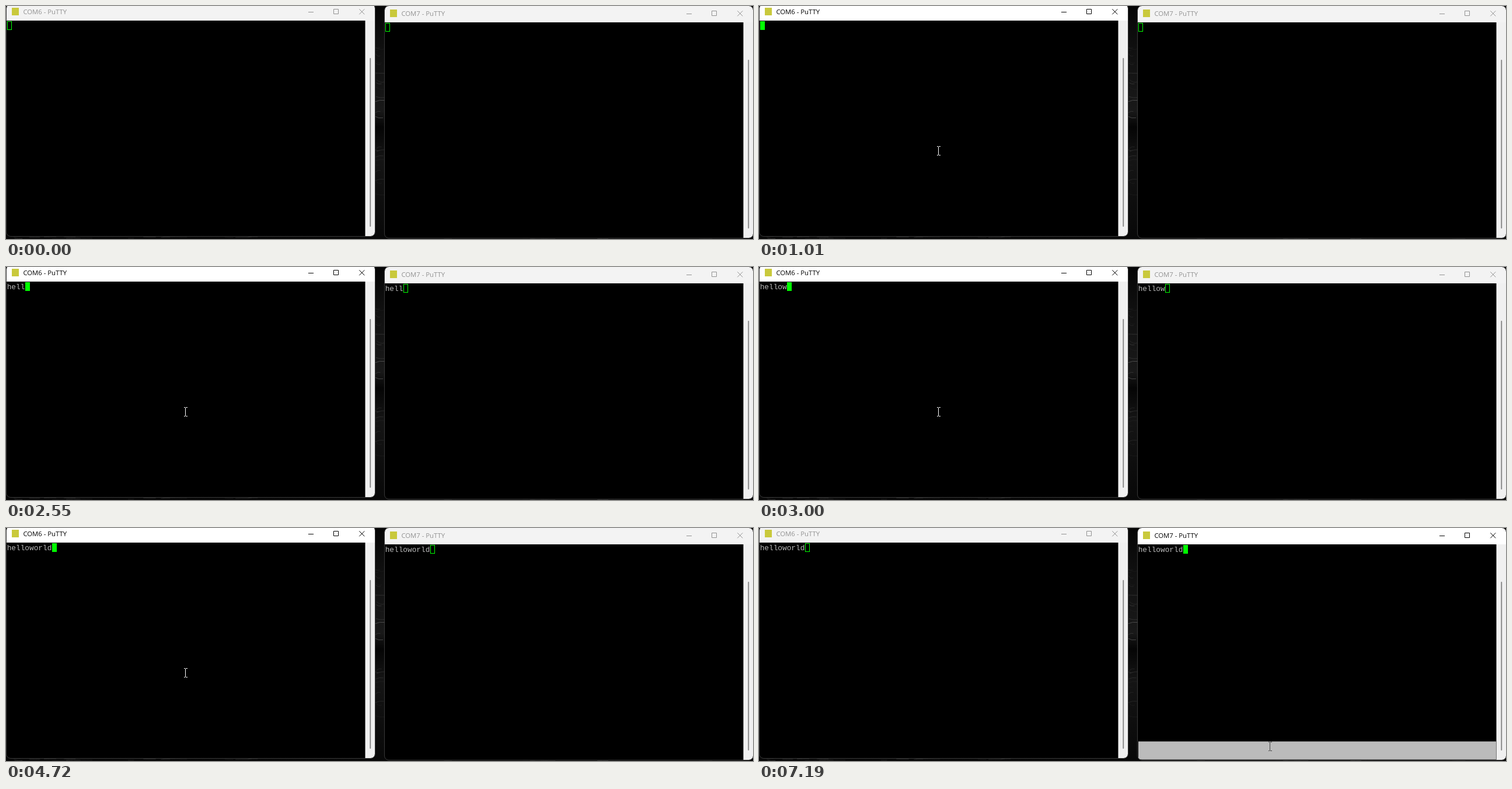
An HTML page for the animation above (8 s loop, 1280 by 399 pixels).

```html
<!DOCTYPE html>
<html lang="en">
<head>
<meta charset="utf-8">
<title>Serial terminals</title>
<style>
  html, body { margin: 0; width: 100%; height: 100%; overflow: hidden; background: #080808; }
  svg { display: block; width: 1280px; height: 399px; }
  .title { font: 11.3px "Open Sans", "Noto Sans", sans-serif; }
  .term { font: 12.78px "Liberation Mono", monospace; fill: #bbb; white-space: pre; }
  .bar { fill: #f3f3f3; }
  .ink { fill: #929292; }
  .buttons { fill: none; stroke: #929292; }
  .active .bar { fill: #fff; }
  .active .ink { fill: #000; }
  .active .buttons { stroke: #000; }
  .block { fill: none; stroke: #0f0; }
  .active .block { fill: #0f0; }
</style>
</head>
<body>
<svg id="stage" viewBox="0 0 1280 399">
  <defs>
    <clipPath id="frame"><rect x="1" width="631" height="397" rx="7"/></clipPath>
    <linearGradient id="shade" x2="0" y2="1">
      <stop offset="0" stop-color="#050505"/>
      <stop offset=".2" stop-color="#111"/>
      <stop offset=".45" stop-color="#191919"/>
      <stop offset=".52" stop-color="#050505"/>
      <stop offset=".65" stop-color="#151515"/>
      <stop offset="1" stop-color="#080808"/>
    </linearGradient>
  </defs>
  <rect width="1280" height="399" fill="url(#shade)"/>
  <g id="ridges" fill="none"></g>
  <g id="windows"></g>
  <g id="mouse">
    <circle id="halo" cx="-2.5" cy="-1" r="11.5" fill="#ff0" fill-opacity=".5"/>
    <path id="beam" d="M-3-7.5H-1M0-7.5H3M-.5-7V7M-3 7.5H-1M0 7.5H3" fill="none"/>
  </g>
</svg>
<script>
const LOOP = 8000, CELL = 7.667, TEXT = 'helloworld';
const KEYS = [1670, 2000, 2270, 2550, 2740, 3000, 3200, 3400, 3530, 4720];
const ENTER = 200, REST = 810, CLICK_LEFT = 880, CLICK_RIGHT = 7050;

const $ = id => document.getElementById(id);
const within = (t, from, to) => t >= from && t < to;

// Faint rock texture behind the windows
function drawRidges() {
  let seed = 17, out = '';
  const rnd = () => (seed = seed * 16807 % 2147483647) / 2147483647;
  const ridge = (x, y, w, dy, tone) => {
    out += `<path d="M${x} ${y}q${w / 2} ${dy} ${w} ${dy * .6}" stroke="rgb(${tone},${tone},${tone})"/>`;
  };
  for (let i = 0; i < 26; i++) {
    const y = i < 16 ? 70 + rnd() * 118 : 238 + rnd() * 85;
    ridge(629 + rnd() * 6, y, 8 + rnd() * 12, rnd() * 14 - 5, 24 + rnd() * 30 | 0);
  }
  for (let i = 0; i < 34; i++) ridge(rnd() * 1260, 395 + rnd() * 4, 10 + rnd() * 18, rnd() * 4 - 2, 20 + rnd() * 25 | 0);
  ridge(632, 164, 17, -4, 75);
  ridge(632, 189, 14, 4, 70);
  $('ridges').innerHTML = out;
}

function makeWindow(x, y, name) {
  const g = document.createElementNS('http://www.w3.org/2000/svg', 'g');
  g.setAttribute('transform', `translate(${x} ${y})`);
  g.innerHTML = `
    <g clip-path="url(#frame)">
      <rect class="bar" width="632" height="28"/>
      <rect x="1" y="28" width="615" height="369"/>
      <rect x="615.5" y="28" width="17" height="369" fill="#f0f0f0"/>
      <rect x="623.4" y="92" width="1.8" height="289" rx=".9" fill="#808080"/>
      <rect class="picked" x="2" y="365.5" width="613" height="31" fill="#bbb"/>
    </g>
    <rect x=".5" y="-.5" width="632" height="398" rx="7.5" fill="none" stroke="#444" stroke-opacity=".8"/>
    <rect x="10" y="6" width="12" height="13" fill="#c9c93c"/>
    <text class="title ink" x="29.4" y="17">${name}</text>
    <path class="buttons" d="M518 13.5h9M561.5 8.5h8v8h-8zM605.3 8.3l9 9M614.3 8.3l-9 9"/>
    <text class="term" x="1.7" y="41"></text>
    <rect class="block" y="29.5" width="7" height="14"/>`;
  $('windows').append(g);
  const [text, block, picked] = ['.term', '.block', '.picked'].map(s => g.querySelector(s));
  return (typed, active, selected) => {
    g.classList.toggle('active', active);
    text.textContent = TEXT.slice(0, typed);
    block.setAttribute('x', Math.round(2 + CELL * typed) + .5);
    picked.style.display = selected ? '' : 'none';
  };
}

function mouseAt(t) {
  if (t >= 7190) return [876, 374];
  if (t >= 7120) return [873, 377];
  if (t >= CLICK_RIGHT) return [871, 378];
  const step = Math.min(9, Math.floor((t - ENTER) / (REST - ENTER) * 9));
  const left = (1 - step / 9) ** 2;
  return [Math.round(308 + 643 * left), Math.round(248 + 137 * left)];
}

drawRidges();
const showLeft = makeWindow(0, -3, 'COM6 - PuTTY');
const showRight = makeWindow(648, 0, 'COM7 - PuTTY');

function render(t) {
  const typed = KEYS.filter(k => t >= k).length;
  const right = t >= CLICK_RIGHT;
  showLeft(typed, within(t, CLICK_LEFT, CLICK_RIGHT), false);
  showRight(typed, right, right);
  $('mouse').style.display = t < ENTER ? 'none' : '';
  $('mouse').setAttribute('transform', `translate(${mouseAt(t)})`);
  $('beam').setAttribute('stroke', right ? '#444' : '#fff');
  const pressed = within(t, CLICK_LEFT, 1010) || within(t, CLICK_RIGHT, 7190);
  $('halo').style.display = pressed ? '' : 'none';
}

const start = performance.now();
function tick() {
  render((performance.now() - start) % LOOP);
  requestAnimationFrame(tick);
}
tick();
</script>
</body>
</html>
```
